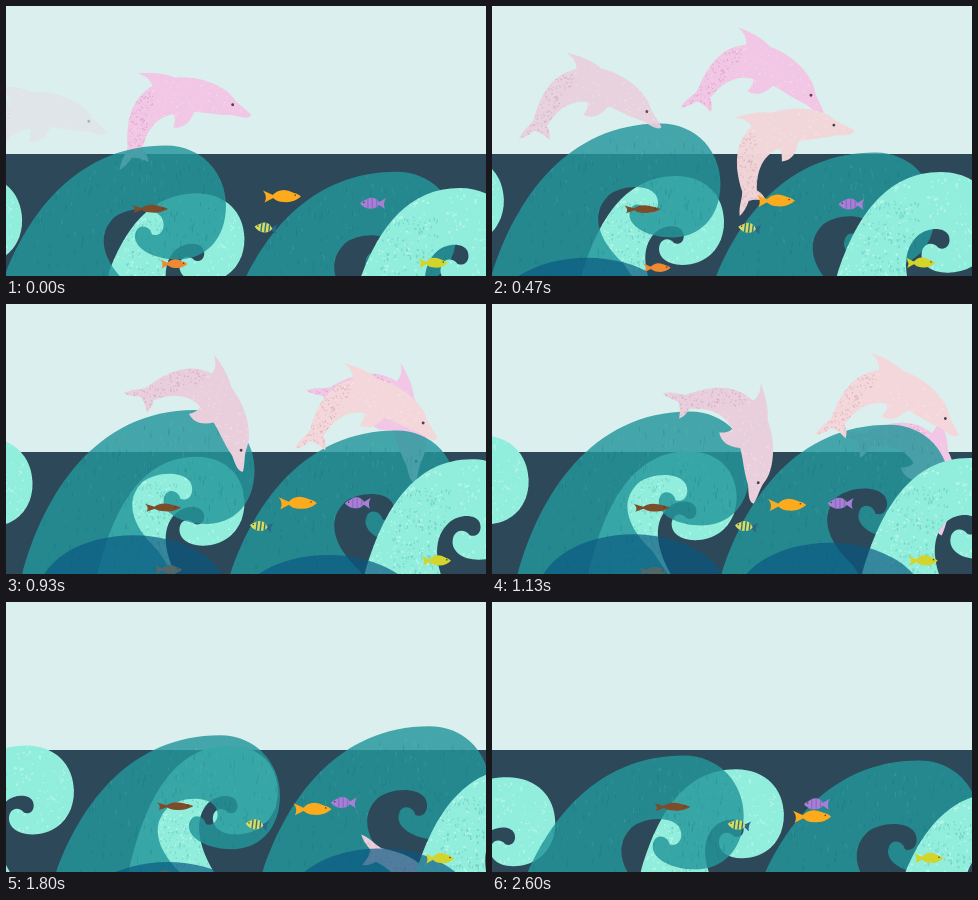
These frames come from a looping animation (480x270 px, 2.67 s). An HTML page with a canvas:

```html
<!DOCTYPE html>
<html lang="en">
<head>
<meta charset="utf-8">
<title>Dolphins and waves</title>
<style>
html, body { margin: 0; width: 100%; height: 100%; overflow: hidden; background: #daefee; }
canvas { display: block; width: 480px; height: 270px; }
</style>
</head>
<body>
<canvas id="stage" width="480" height="270"></canvas>
<script>
const ctx = document.getElementById('stage').getContext('2d');
const LOOP = 2670, STEPS = 40, STEPS_PER_SECOND = 15;

// Motion rules, each a function of the step
const sway = (mid, reach, peak, period = 54) =>
  s => mid + reach * Math.cos(2 * Math.PI * (s - peak) / period);
const drift = (start, speed) => s => start + speed * s;
const glide = (start, speed, gain) => s => start + speed * s + gain * s * s;
const leap = (start, lift, fall) => s => start - lift * s + fall * s ** 3;
const turnOver = (from, to, steps) =>
  s => from + (to - from) * (1 - Math.cos(Math.PI * Math.min(1, s / steps))) / 2;

function random(seed) {
  return () => (seed = (seed * 16807) % 2147483647) / 2147483647;
}

// Small scattered marks that give a surface its printed grain
function grain(seed, count, x, y, w, h, mw, mh) {
  const rnd = random(seed), path = new Path2D();
  for (let i = 0; i < count; i++) {
    path.rect(x + rnd() * w, y + rnd() * h, mw * (0.4 + rnd()), mh * (0.4 + rnd()));
  }
  return path;
}

const teal = {
  color: 'rgba(36,151,156,.82)',
  shape: new Path2D('M-112 170C-92 90-40 0 62 0C98 0 122 28 122 60C122 95 100 114 74 114' +
    'C46 114 26 100 32 86C35 78 46 80 48 89C58 92 63 80 57 71C48 60 22 62 10 72C-8 90-2 115 25 140L45 170Z'),
  marks: [
    ['rgba(10,90,105,.2)', grain(11, 240, -100, 15, 220, 150, 1, 5)],
    ['rgba(120,205,200,.16)', grain(29, 90, -80, 0, 200, 90, 1, 4)]
  ]
};
const aqua = {
  color: '#92eedc',
  shape: new Path2D('M-152 140C-138 70-112 0-48 0C-18 0 0 20 0 46C0 72-18 89-42 89' +
    'C-60 89-68 78-64 68C-61 62-54 62-50 67C-44 70-38 64-41 56C-45 48-60 49-68 56C-84 70-84 100-55 140Z'),
  marks: [
    ['rgba(225,255,245,.5)', grain(5, 260, -145, 5, 70, 130, 1.5, 1.5)],
    ['rgba(225,255,245,.4)', grain(17, 120, -60, 0, 60, 90, 1.5, 2)],
    ['rgba(60,170,165,.35)', grain(41, 240, -118, 25, 50, 115, 1.2, 2)]
  ]
};
const dolphinShape = new Path2D('M-62 66C-60 55-56 52-54 44C-56 15-48-5-30-15C-32-22-38-25-44-27' +
  'C-30-28-18-27-8-23C15-25 40-15 48-3C52 3 60 7 65 13C62 18 52 14 46 13C30 13 20 10 10 10' +
  'C6 20 0 26-10 25C-8 18-8 15-10 12C-25 15-35 25-40 46C-36 50-34 54-34 58C-42 54-46 54-50 54C-54 60-58 64-62 66Z');
const dolphinMarks = [
  ['rgba(255,248,252,.4)', grain(7, 200, -60, -25, 120, 60, 1.2, 1)],
  ['rgba(170,105,140,.32)', grain(13, 260, -62, -12, 32, 80, 1, 1.2)]
];

function placed(x, y, draw) {
  ctx.save();
  ctx.translate(x, y);
  draw();
  ctx.restore();
}

function textured(shape, color, marks) {
  ctx.fillStyle = color;
  ctx.fill(shape);
  ctx.clip(shape);
  for (const [tone, path] of marks) {
    ctx.fillStyle = tone;
    ctx.fill(path);
  }
}

function wave(kind, x, y, size = 1) {
  return s => placed(x(s), y(s), () => {
    ctx.scale(size, size);
    textured(kind.shape, kind.color, kind.marks);
  });
}

// x, y: middle between tail and nose; turn in degrees
function dolphin(color, x, y, turn, alpha = () => 1) {
  return s => placed(x(s), y(s), () => {
    ctx.globalAlpha = Math.min(1, alpha(s));
    ctx.rotate(turn(s) * Math.PI / 180);
    ctx.scale(1.04, 1.04);
    ctx.translate(-5, -36);
    textured(dolphinShape, color, dolphinMarks);
    ctx.fillStyle = '#4b4152';
    ctx.beginPath();
    ctx.arc(47, 3, 1.4, 0, 7);
    ctx.fill();
  });
}

function swell(x, y) {
  return s => {
    ctx.fillStyle = 'rgba(8,88,128,.68)';
    ctx.beginPath();
    ctx.ellipse(x(s), y(s) + 60, 95, 60, 0, 0, 7);
    ctx.fill();
  };
}

function fish(x, y, { len, tall, color, tail = color, stripe, dir = 1, tilt = 0 }) {
  const h = len / 2;
  const fin = new Path2D(`M${-h * 0.3} 0L${-h} ${-tall * 1.1}Q${-h * 0.75} 0 ${-h * 0.92} ${tall * 1.1}Z`);
  const body = new Path2D(`M${-h * 0.55} 0Q${-h * 0.1} ${-tall * 1.9} ${h * 0.6} ${-tall * 0.7}` +
    `Q${h * 0.9} ${-tall * 0.4} ${h} 0Q${h * 0.6} ${tall * 1.2} ${h * 0.1} ${tall}Q${-h * 0.3} ${tall} ${-h * 0.55} 0Z`);
  return s => placed(x(s), y(s), () => {
    ctx.rotate(tilt);
    ctx.scale(dir, 1);
    ctx.fillStyle = tail;
    ctx.fill(fin);
    ctx.fillStyle = color;
    ctx.fill(body);
    ctx.clip(body);
    if (stripe) {
      ctx.fillStyle = stripe;
      for (let i = -1; i < 2; i++) ctx.fillRect(i * h * 0.34, -tall * 1.5, 1.4, tall * 3);
    }
    ctx.fillStyle = '#4a3a28';
    ctx.fillRect(h * 0.66, -tall * 0.35, 1.3, 1.3);
  });
}

// Back to front
const scene = [
  wave(aqua, sway(42, 31, 32), sway(156, -25, 18)),
  wave(aqua, sway(262, 30, 40, 66), sway(170, -28, 23.5, 66)),
  dolphin('#f2c6e5', glide(183, 10.8, 0.13), leap(133, 5.9, 0.0305), turnOver(0, 68, 17)),
  wave(teal, sway(125, 27, 27), sway(130, -24, 14.5, 46)),
  wave(teal, sway(345, 24, 34), sway(145, -27, 21)),
  dolphin('#e9cfdc', glide(38, 8.2, 0.15), leap(148, 4, 0.0136), turnOver(2, 104, 27), drift(0.32, 0.085)),
  wave(aqua, sway(538, 36, 32), sway(174, -20, 17), 1.13),
  dolphin('#f3d7da', glide(285, 0.8, 0.35), leap(193, 4.4, 0.0022), turnOver(-35, 23, 17), drift(0, 0.14)),
  fish(drift(168, -0.4), drift(258, 0.55), { len: 27, tall: 4, color: '#ef8a33' }),
  swell(sway(120, 42, 26), sway(258, -28, 16, 42)),
  swell(sway(330, 45, 29), sway(258, -26, 21, 34)),
  fish(drift(144, 0.93), drift(203, 0.05), { len: 36, tall: 3.6, color: '#7d4d2b' }),
  fish(drift(367, -1.08), drift(197.5, 0.12), { len: 26, tall: 5, color: '#a77fd6', stripe: '#8f6cc2', dir: -1 }),
  fish(drift(276, 1.13), drift(190.5, 0.62), { len: 38, tall: 5.5, color: '#fdaa1c' }),
  fish(drift(260, -0.33), drift(222, 0.03),
    { len: 23, tall: 4.6, color: '#d7dc62', tail: '#2b6789', stripe: '#2e7280', dir: -1, tilt: 0.12 }),
  fish(drift(427, 0.25), drift(257, -0.02), { len: 29, tall: 4.6, color: '#d3d52c' })
];

function render(step) {
  ctx.fillStyle = '#daefee';
  ctx.fillRect(0, 0, 480, 270);
  ctx.fillStyle = '#2d4858';
  ctx.fillRect(0, 148, 480, 122);
  scene.forEach(draw => draw(step));
}

function tick() {
  const time = performance.now() % LOOP;
  render(Math.min(STEPS - 1, Math.floor((time + 4) * STEPS_PER_SECOND / 1000)));
  requestAnimationFrame(tick);
}
tick();
</script>
</body>
</html>
```
